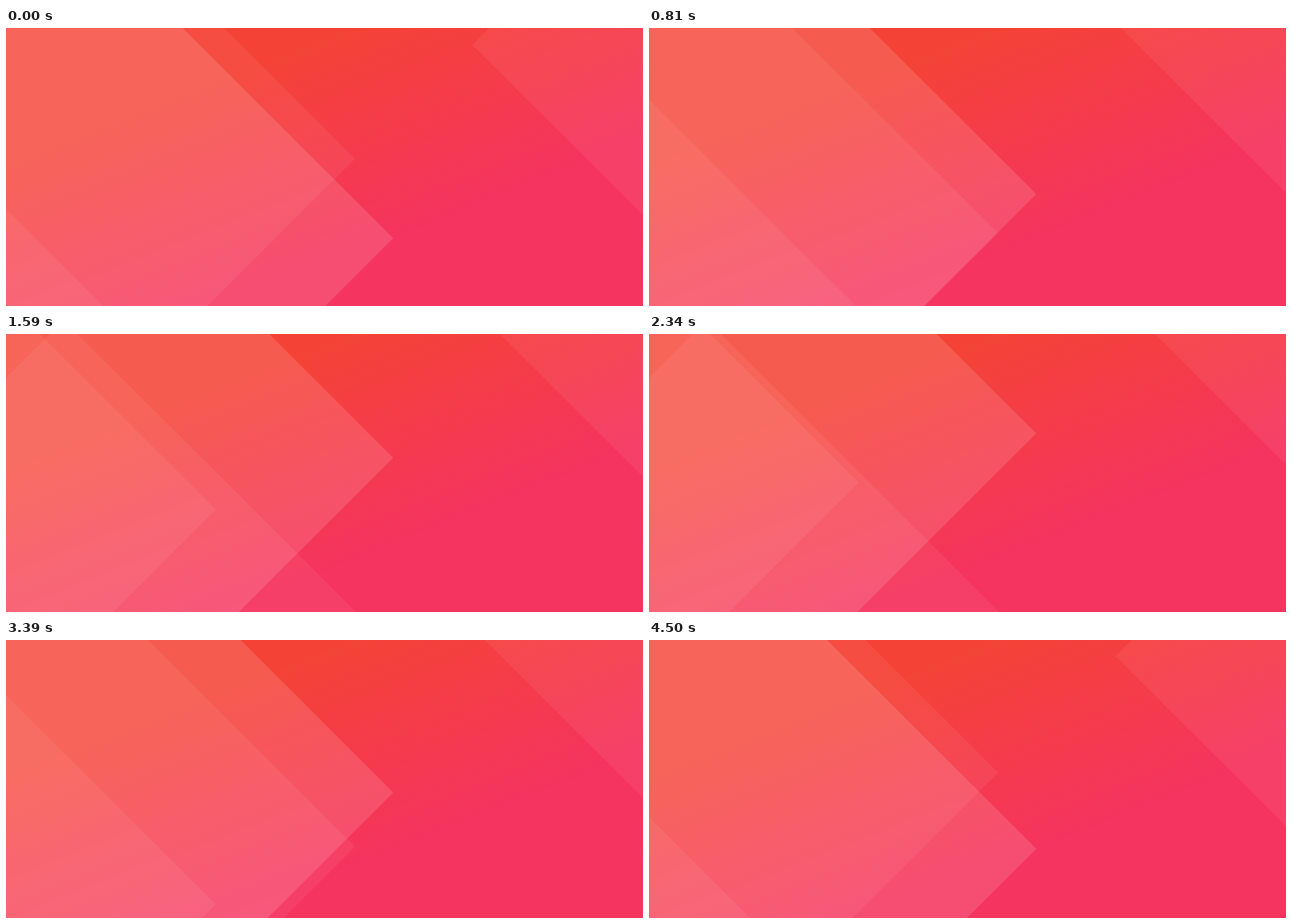
These frames come from a looping animation (750x328 px, 4530 ms). An HTML page:

```html
<!DOCTYPE html>
<html lang="en">
<head>
<meta charset="utf-8">
<title>Drifting diamonds</title>
<style>
  html, body { margin: 0; width: 100%; height: 100%; overflow: hidden; background: #f44336; }
  svg { display: block; width: 100%; height: 100%; }
</style>
</head>
<body>
<svg id="stage" viewBox="0 0 750 328" preserveAspectRatio="none">
  <defs>
    <linearGradient id="bg" gradientUnits="userSpaceOnUse" x1="55" y1="139.5" x2="148" y2="372">
      <stop offset="0" stop-color="#f44336"/>
      <stop offset="1" stop-color="#f5345f"/>
    </linearGradient>
  </defs>
  <rect width="750" height="328" fill="url(#bg)"/>
</svg>
<script>
const LOOP = 4530, STEP = 30;
const stage = document.getElementById('stage');

// tip: x of the visible corner; half: half diagonal (negative = corner points left)
// y travels from rest to far until turn, then back
const shapes = [
  { tip: 456, half: 400, rest: 248, far: 108, turn: 2185, alpha: 0.125 },
  { tip: 411, half: 343, rest: 154, far: 361, turn: 1904, alpha: 0.055 },
  { tip: 247, half: 300, rest: 460, far: 136, turn: 2038, alpha: 0.06 },
  { tip: 549, half: -400, rest: 20, far: -52, turn: 2180, alpha: 0.06 }
];

for (const s of shapes) {
  const mid = s.tip - s.half, r = Math.abs(s.half);
  s.el = document.createElementNS('http://www.w3.org/2000/svg', 'path');
  s.el.setAttribute('d', `M${mid - r} 0L${mid} ${-r}L${mid + r} 0L${mid} ${r}Z`);
  s.el.setAttribute('fill', '#fff');
  s.el.setAttribute('fill-opacity', s.alpha);
  stage.appendChild(s.el);
}

function draw(t) {
  for (const s of shapes) {
    const k = t < s.turn ? t / s.turn : (LOOP - t) / (LOOP - s.turn);
    const y = s.rest + (s.far - s.rest) * k;
    s.el.setAttribute('transform', `translate(0 ${y.toFixed(2)})`);
  }
}

const start = performance.now();
function tick() {
  const t = (performance.now() - start) % LOOP;
  draw(Math.floor(t / STEP) * STEP);
  requestAnimationFrame(tick);
}
draw(0);
requestAnimationFrame(tick);
</script>
</body>
</html>
```
